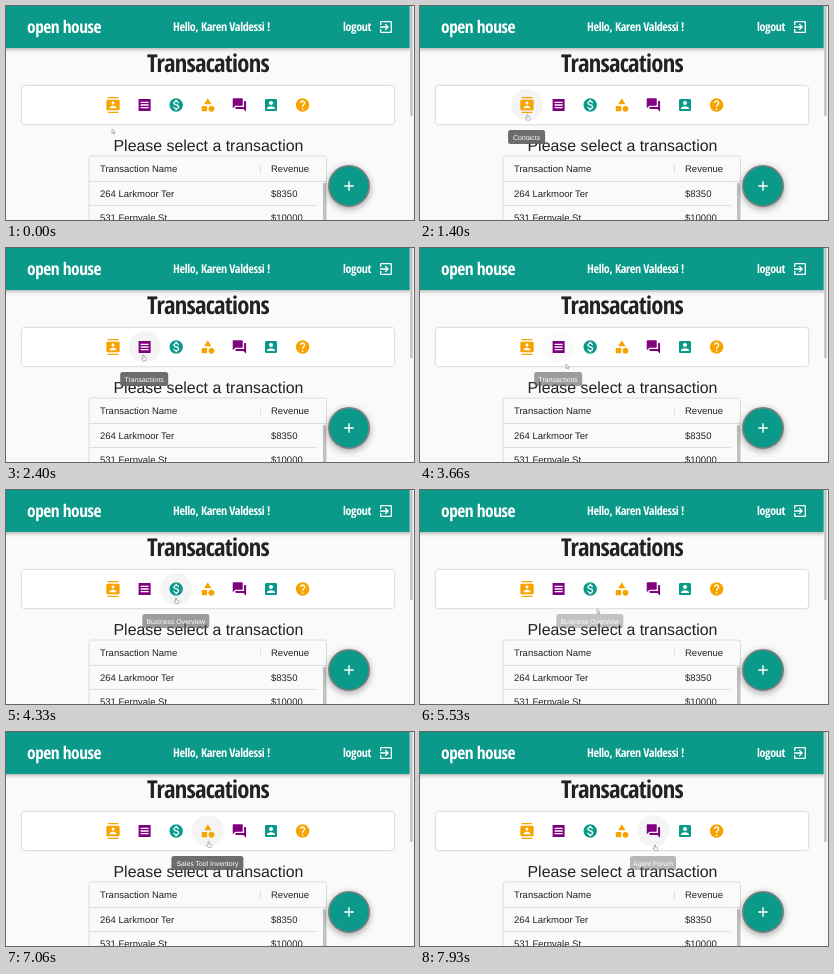
An HTML page for the animation above (8000 ms loop, 408x214 px).

```html
<!DOCTYPE html>
<html lang="en">
<head>
<meta charset="utf-8">
<title>open house</title>
<style>
html, body { margin: 0; width: 100%; height: 100%; overflow: hidden; background: #fafafa; }
svg { display: block; }
text { font-family: "Liberation Sans", Arial, sans-serif; fill: #222; text-rendering: geometricPrecision; }
.narrow {
  font-family: "Open Sans Condensed", "Roboto Condensed", "Liberation Sans Narrow", Roboto, sans-serif;
  font-stretch: condensed; letter-spacing: -.03em; text-anchor: middle;
}
.bold { font-weight: 700; }
.bar { fill: #fff; }
.cell { font-size: 9.5px; }
.tip text { font-size: 6.9px; fill: #fff; text-anchor: middle; }
.card { filter: drop-shadow(0 .8px .9px rgba(0,0,0,.3)); }
.head { filter: drop-shadow(0 1.6px 2px rgba(0,0,0,.35)); }
.fab { filter: drop-shadow(0 2.5px 3.5px rgba(0,0,0,.35)); }
</style>
</head>
<body>
<svg id="stage" width="408" height="214" viewBox="0 0 408 214">
  <rect width="408" height="214" fill="#fafafa"/>
  <rect class="head" x="-6" y="-6" width="416" height="48" fill="#0b9a89"/>
  <g id="titles"></g>
  <path transform="translate(372 13) scale(.667)" fill="#fff" d="M10.09 15.59L11.5 17l5-5-5-5-1.41 1.41L12.67 11H3v2h9.67l-2.58 2.59zM19 3H5c-1.11 0-2 .9-2 2v4h2V5h14v14H5v-4H3v4c0 1.1.89 2 2 2h14c1.1 0 2-.9 2-2V5c0-1.1-.9-2-2-2z"/>

  <rect class="card" x="16" y="80" width="372" height="38" rx="2.5" fill="#fff"/>
  <g id="rings"></g>
  <g id="icons"></g>

  <text x="107.5" y="145" font-size="15.9">Please select a transaction</text>
  <rect x="83" y="150" width="237.5" height="80" rx="2.5" fill="#fafafa" stroke="#dcdcdc"/>
  <path d="M83 175.5H320M83 199.5H311M254.5 159v8" stroke="#dedede" fill="none"/>
  <g class="cell">
    <text x="94" y="166">Transaction Name</text><text x="265" y="166">Revenue</text>
    <text x="94" y="191">264 Larkmoor Ter</text><text x="265" y="191">$8350</text>
    <text x="94" y="214.5">531 Fernvale St</text><text x="265" y="214.5">$10000</text>
  </g>
  <rect x="317" y="177" width="3" height="40" rx="1" fill="#c1c1c1"/>

  <circle class="fab" cx="343" cy="180" r="20.2" fill="#0b9a89" stroke="#7d7d7d" stroke-width="1.6"/>
  <path d="M338.3 180h9.4M343 175.3v9.4" stroke="#fff" stroke-width="1.4"/>

  <rect x="403.7" width="4.3" height="214" fill="#f8f8f8"/>
  <rect x="404.2" width="2.4" height="110" fill="#c1c1c1"/>
  <g id="tips"></g>
  <g id="cursor" stroke="#777" stroke-width=".5" fill="#fff">
    <path id="arrow" d="M0 0v4.4l1.1-.9.8 1.7.7-.3-.8-1.7h1.4z"/>
    <path id="hand" d="M-.5 0q.6-.6 1 0v2l2 .6q.6.3.4 1.2l-.5 1.8h-2.8l-1.7-2.2q.2-.8 1.6.1z"/>
  </g>
</svg>
<script>
const LOOP = 8000, STEP = 1000 / 15;
const ORANGE = "#f7a400", PURPLE = "#800080", TEAL = "#0b9a89";
// text, centre x, centre y, room, classes
const titles = [
  ["open house", 58, 21, 74, "bar bold"],
  ["Hello, Karen Valdessi !", 215.5, 21, 97, "bar"],
  ["logout", 351, 21, 28, "bar"],
  ["Transacations", 202, 57.5, 122, "bold"]
];
const icons = [
  [ORANGE, "M20 0H4v2h16V0zM4 24h16v-2H4v2zM20 4H4c-1.1 0-2 .9-2 2v12c0 1.1.9 2 2 2h16c1.1 0 2-.9 2-2V6c0-1.1-.9-2-2-2zm-8 2.75c1.24 0 2.25 1.01 2.25 2.25s-1.01 2.25-2.25 2.25S9.75 10.24 9.75 9 10.76 6.75 12 6.75zM17 17H7v-1.5c0-1.67 3.33-2.5 5-2.5s5 .83 5 2.5V17z"],
  [PURPLE, "M3 3v18h18V3zM18 17H6v-2h12v2zm0-4H6v-2h12v2zm0-4H6V7h12v2z"],
  [TEAL, "M12 2C6.48 2 2 6.48 2 12s4.48 10 10 10 10-4.48 10-10S17.52 2 12 2zm1.41 16.09V20h-2.67v-1.93c-1.71-.36-3.16-1.46-3.27-3.4h1.96c.1 1.05.82 1.87 2.65 1.87 1.96 0 2.4-.98 2.4-1.59 0-.83-.44-1.61-2.67-2.14-2.48-.6-4.18-1.62-4.18-3.67 0-1.72 1.39-2.84 3.11-3.21V4h2.67v1.95c1.86.45 2.79 1.86 2.85 3.39H14.3c-.05-1.11-.64-1.87-2.22-1.87-1.5 0-2.4.68-2.4 1.64 0 .84.65 1.39 2.67 1.91s4.18 1.39 4.18 3.91c-.01 1.83-1.38 2.83-3.12 3.16z"],
  [ORANGE, "M12 2l-5.5 9h11zM17.5 13a4.5 4.5 0 1 0 .01 0zM3 13.5h8v8H3z"],
  [PURPLE, "M21 6h-2v9H6v2c0 .55.45 1 1 1h11l4 4V7c0-.55-.45-1-1-1zm-4 6V3c0-.55-.45-1-1-1H3c-.55 0-1 .45-1 1v14l4-4h10c.55 0 1-.45 1-1z"],
  [TEAL, "M3 5v14c0 1.1.89 2 2 2h14c1.1 0 2-.9 2-2V5c0-1.1-.9-2-2-2H5c-1.11 0-2 .9-2 2zm12 4c0 1.66-1.34 3-3 3s-3-1.34-3-3 1.34-3 3-3 3 1.34 3 3zm-9 8c0-2 4-3.1 6-3.1s6 1.1 6 3.1v1H6v-1z"],
  [ORANGE, "M12 2C6.48 2 2 6.48 2 12s4.48 10 10 10 10-4.48 10-10S17.52 2 12 2zm1 17h-2v-2h2v2zm2.07-7.75l-.9.92C13.45 12.9 13 13.5 13 15h-2v-.5c0-1.1.45-2.1 1.17-2.83l1.24-1.26c.37-.36.59-.86.59-1.41 0-1.1-.9-2-2-2s-2 .9-2 2H8c0-2.21 1.79-4 4-4s4 1.79 4 4c0 .88-.36 1.68-.93 2.25z"]
];
// label, width, ring on/off, tip on/off (ms)
const hovers = [
  ["Contacts", 37, 300, 1530, 430, 1600],
  ["Transactions", 48, 2060, 3580, 2200, 3600],
  ["Business Overview", 67, 3930, 5330, 4200, 5410],
  ["Sales Tool Inventory", 72, 5860, 7200, 6000, 7330],
  ["Agent Forum", 46, 7800, 9000, 7840, 9000]
];
// time, x, y
const path = [
  [0, 106, 123], [60, 106, 123], [400, 107, 108], [1330, 107, 108],
  [1800, 115, 118], [2200, 137.5, 107], [3200, 137.5, 107],
  [3660, 146, 116], [4060, 170, 108], [5130, 170, 108],
  [5530, 177, 119], [6000, 202, 109], [6990, 202, 109],
  [7460, 211, 120], [7930, 235, 113], [8000, 235, 113]
];
const $ = id => document.getElementById(id);
const iconX = i => 107 + 31.6 * i;
const clamp = v => Math.max(0, Math.min(1, v));
const ease = v => v * v * (3 - 2 * v);
const fade = (t, on, off, ms) => clamp((t - on) / ms) * (1 - clamp((t - off) / ms));

$("titles").innerHTML = titles.map(([text, x, , , cls]) =>
  `<text class="narrow ${cls}" x="${x}" font-size="20">${text}</text>`).join("");
// pick the font size that suits the room, whichever narrow face is present
titles.forEach(([, , y, room], i) => {
  const el = $("titles").children[i];
  const size = 20 * room / el.getComputedTextLength();
  el.setAttribute("font-size", size);
  el.setAttribute("y", y + .36 * size);
});
$("icons").innerHTML = icons.map(([color, d], i) =>
  `<path transform="translate(${iconX(i) - 8} 91) scale(.667)" fill="${color}" d="${d}"/>`).join("");
$("rings").innerHTML = hovers.map((h, i) =>
  `<circle cx="${iconX(i)}" cy="99" r="16" fill="#000" fill-opacity=".045"/>`).join("");
$("tips").innerHTML = hovers.map(([label, w], i) => {
  const x = iconX(i) - .4;
  return `<g class="tip"><rect x="${x - w / 2}" y="124" width="${w}" height="14" rx="2.5" fill="#616161" fill-opacity=".92"/>
    <text x="${x}" y="133.5">${label}</text></g>`;
}).join("");
const rings = [...$("rings").children], tips = [...$("tips").children];

function cursorAt(t) {
  const i = Math.max(1, path.findIndex(p => p[0] >= t));
  const [t0, x0, y0] = path[i - 1], [t1, x1, y1] = path[i];
  const k = ease(clamp((t - t0) / (t1 - t0)));
  return [x0 + (x1 - x0) * k, y0 + (y1 - y0) * k];
}

function draw(now) {
  const t = Math.floor((now % LOOP + 7) / STEP) * STEP % LOOP;
  let over = false;
  hovers.forEach(([, , on, off, tipOn, tipOff], i) => {
    rings[i].style.opacity = fade(t, on, off, 150);
    tips[i].style.opacity = fade(t, tipOn, tipOff, 200);
    over = over || (t >= on && t < off);
  });
  const [x, y] = cursorAt(t);
  $("cursor").setAttribute("transform", `translate(${x} ${y})`);
  $("hand").style.display = over ? "" : "none";
  $("arrow").style.display = over ? "none" : "";
}

const start = performance.now();
function tick() {
  draw(performance.now() - start);
  requestAnimationFrame(tick);
}
tick();
</script>
</body>
</html>
```
